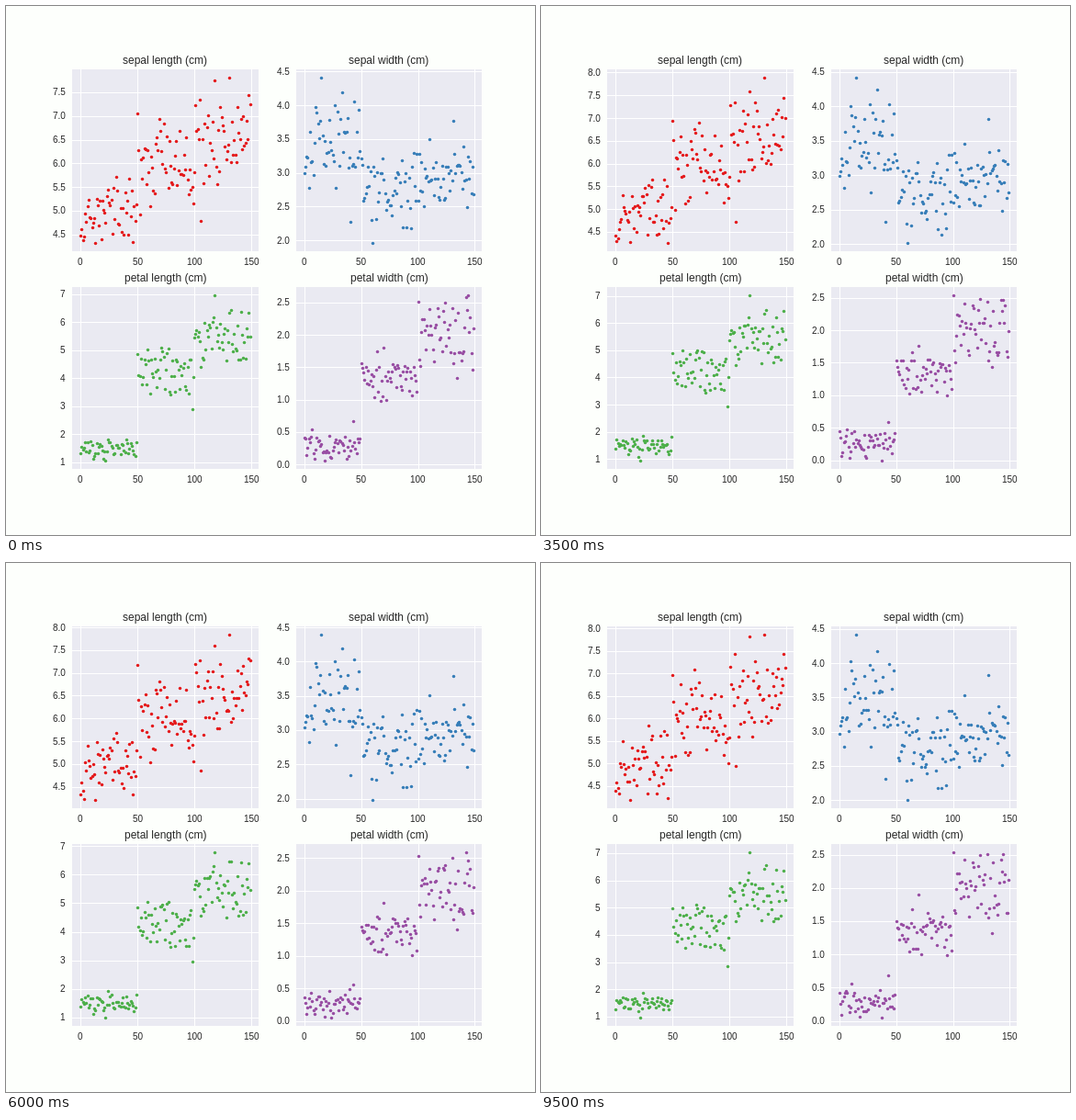
An HTML page with a canvas that plays this animation: 576x576 px, repeating every 10000 ms.

```html
<!DOCTYPE html>
<html lang="en">
<head>
<meta charset="utf-8">
<title>Iris features with jitter</title>
<style>
  html, body { margin: 0; width: 100%; height: 100%; overflow: hidden; background: #fdfffc; }
  canvas { display: block; }
</style>
</head>
<body>
<canvas id="stage" width="576" height="576"></canvas>
<script>
const ctx = document.getElementById('stage').getContext('2d');
const SIZE = 576, STEP_MS = 500, STEPS = 20, COUNT = 150;
const W = 202.9, H = 197.67, COLUMNS = [72, 315.5], ROWS = [69.12, 306.33];
const MARGIN = 1 / 22;   // blank share of an axis at either end

// species: mean and deviation of each group of 50; marks: index and value of points that stand out
const panels = [
  {
    title: 'sepal length (cm)', color: '#e41a1c', tick: 0.5, digits: 1, jitter: 0.1,
    species: [[5.01, 0.35], [5.94, 0.52], [6.59, 0.6]],
    marks: [[13, 4.3], [50, 7], [106, 4.9], [118, 7.7], [131, 7.9]]
  },
  {
    title: 'sepal width (cm)', color: '#377eb8', tick: 0.5, digits: 1, jitter: 0.025,
    species: [[3.42, 0.34], [2.77, 0.31], [2.97, 0.3]],
    marks: [[15, 4.4], [33, 4.2], [41, 2.3], [60, 2], [131, 3.8]]
  },
  {
    title: 'petal length (cm)', color: '#4daf4a', tick: 1, digits: 0, jitter: 0.06,
    species: [[1.46, 0.16], [4.28, 0.45], [5.55, 0.53]],
    marks: [[22, 1], [24, 1.9], [98, 3], [106, 4.5], [118, 6.9]]
  },
  {
    title: 'petal width (cm)', color: '#984ea3', tick: 0.5, digits: 1, jitter: 0.05,
    species: [[0.25, 0.1], [1.33, 0.2], [2.03, 0.27]],
    marks: [[43, 0.6], [70, 1.8], [100, 2.5], [134, 1.4], [144, 2.5]]
  }
];

const clamp = (v, lo, hi) => Math.min(hi, Math.max(lo, v));
const snap = v => Math.round(v) + 0.5;

function random(seed) {
  return () => {
    seed = (seed + 0x6d2b79f5) | 0;
    let t = Math.imul(seed ^ (seed >>> 15), 1 | seed);
    t = (t + Math.imul(t ^ (t >>> 7), 61 | t)) ^ t;
    return ((t ^ (t >>> 14)) >>> 0) / 4294967296;
  };
}

function gaussian(seed) {
  const rnd = random(seed);
  return () => Math.sqrt(-2 * Math.log(1 - rnd())) * Math.cos(2 * Math.PI * rnd());
}

// Measurements come in tenths of a centimetre.
function measure({ species, marks }, seed) {
  const normal = gaussian(seed);
  const data = Array.from({ length: COUNT }, (_, i) => {
    const [mean, deviation] = species[Math.floor(i / 50)];
    return Math.round((mean + deviation * clamp(normal(), -1.7, 1.7)) * 10) / 10;
  });
  for (const [i, v] of marks) data[i] = v;
  return data;
}

function line(x1, y1, x2, y2) {
  ctx.beginPath();
  ctx.moveTo(x1, y1);
  ctx.lineTo(x2, y2);
  ctx.stroke();
}

// Text starts on whole pixels; anchor is the share of its width left of x.
function label(text, x, y, anchor, size) {
  ctx.font = size + 'px "Liberation Sans", Arial, sans-serif';
  ctx.fillStyle = '#262626';
  ctx.fillText(text, Math.round(x - anchor * ctx.measureText(text).width), Math.round(y));
}

function drawPanel({ title, color, tick, digits, x, y }, values) {
  const lo = Math.min(...values), hi = Math.max(...values), pad = (hi - lo) * 0.05;
  const inset = f => MARGIN + (1 - 2 * MARGIN) * f;
  const px = i => x + W * inset(i / (COUNT - 1));
  const py = v => y + H * inset((hi - v) / (hi - lo));
  const left = Math.round(x), top = Math.round(y);
  const right = Math.round(x + W), bottom = Math.round(y + H);

  ctx.fillStyle = '#eaeaf2';
  ctx.fillRect(left, top, right - left, bottom - top);
  ctx.strokeStyle = '#fff';
  ctx.lineWidth = 1;

  for (let i = 0; i <= COUNT; i += 50) {
    line(snap(px(i)), top, snap(px(i)), bottom);
    label(i, px(i), y + H + 15, 0.5, 10);
  }
  for (let k = Math.ceil((lo - pad) / tick); k * tick <= hi + pad; k++) {
    const gy = py(k * tick);
    line(left, snap(gy), right, snap(gy));
    label((k * tick).toFixed(digits), x - 7, gy + 3.5, 1, 10);
  }
  label(title, x + W / 2, y - 6, 0.5, 12);

  ctx.fillStyle = color;
  values.forEach((v, i) => {
    ctx.beginPath();
    ctx.arc(snap(px(i)), snap(py(v)), 1.75, 0, 2 * Math.PI);
    ctx.fill();
  });
}

function draw(step) {
  ctx.fillStyle = '#fdfffc';
  ctx.fillRect(0, 0, SIZE, SIZE);
  panels.forEach((panel, p) => {
    const normal = gaussian(1000 + step * panels.length + p);
    drawPanel(panel, panel.data.map(v => v + panel.jitter * normal()));
  });
}

panels.forEach((panel, p) => {
  panel.x = COLUMNS[p % 2];
  panel.y = ROWS[Math.floor(p / 2)];
  panel.data = measure(panel, 41 + p);
});

const start = performance.now();
let shown = -1;

function play(now) {
  const step = Math.floor(Math.max(0, now - start) / STEP_MS) % STEPS;
  if (step !== shown) draw(shown = step);
  requestAnimationFrame(play);
}
play(start);
</script>
</body>
</html>
```
